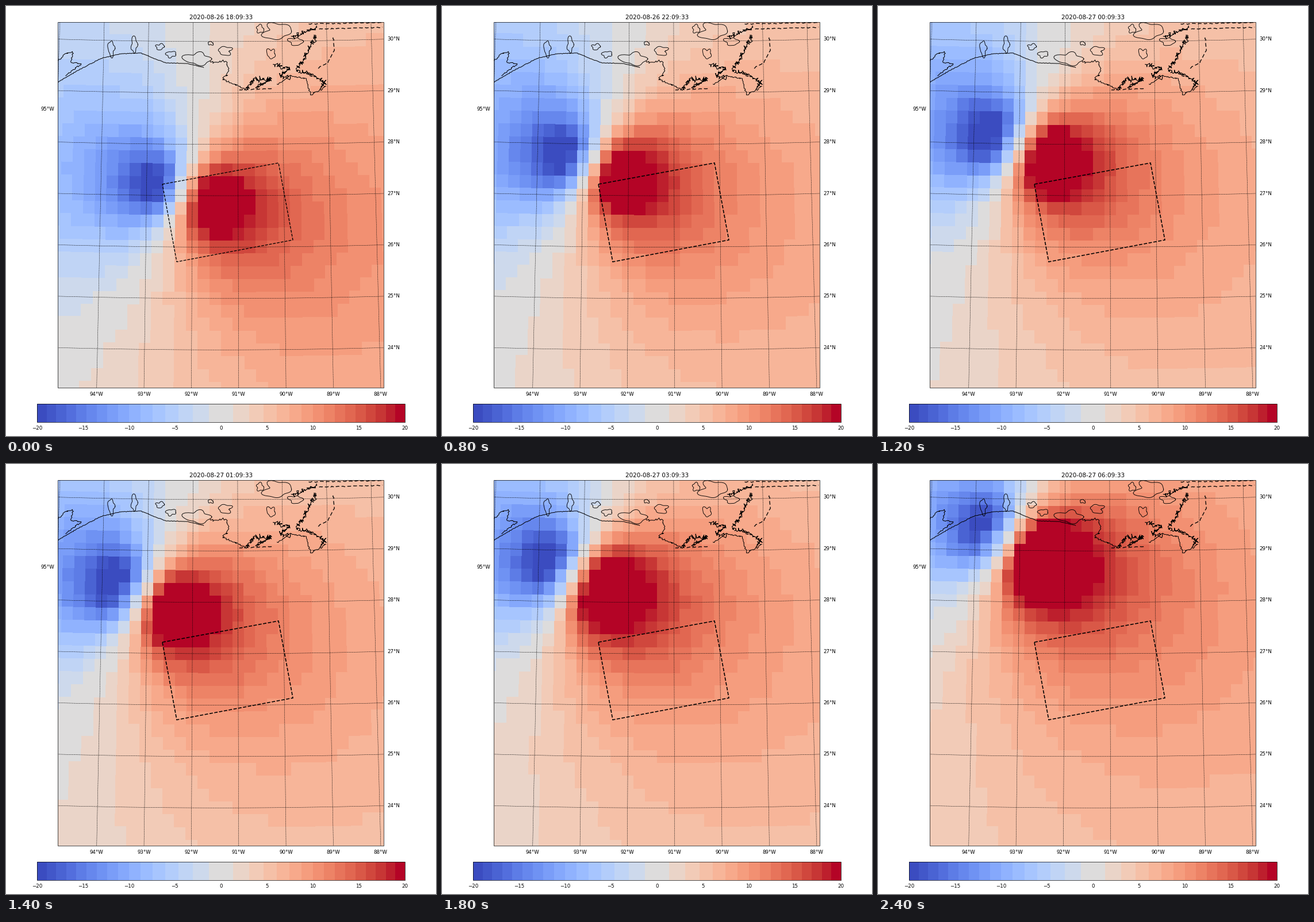
Write a matplotlib script that moves like this. It is 748 px wide and 748 px high and loops after 2600 ms.

```python
import numpy as np
import matplotlib.pyplot as plt
from matplotlib.animation import FuncAnimation
from matplotlib.colors import BoundaryNorm, ListedColormap
from matplotlib.patches import Polygon, Rectangle

SIZE, DPI = 748, 72          # at 72 dpi one point is one pixel
HOURS, MIDDLE = 13, 374
LEFT, RIGHT, TOP, BOTTOM = 90.3, 657.4, 28.3, 664
LABEL, TITLE, THIN = 8.66, 10.39, 0.69

plt.rcParams["font.family"] = "DejaVu Sans"
fig = plt.figure(figsize=(SIZE / DPI, SIZE / DPI), dpi=DPI, facecolor="white")
ax = fig.add_axes([0, 0, 1, 1])
ax.axis("off")

# Conic projection from degrees to stage pixels
CONE, RHO, DEGREE = 0.454, 10058, 89.4


def project(lon, lat):
    rho = RHO - (lat - 27) * DEGREE
    theta = CONE * np.radians(lon + 91.37)
    return MIDDLE + 0.3 + rho * np.sin(theta), 330 - RHO + rho * np.cos(theta)


lons, lats = np.arange(-95.25, -87, 0.25), np.arange(22.75, 30.9, 0.25)
cell_x, cell_y = project(*np.meshgrid(lons, lats))


def field(hour):
    """Northward wind of a growing, lopsided vortex in a weak steering flow."""
    s = hour / (HOURS - 1)
    dx = cell_x - (225 + 83 * (1 - s) ** 2.2)
    dy = cell_y - (325 - 185 * s ** 1.25)
    r = np.hypot(dx, dy) + 1e-6
    u = r / (52 + 8 * s)
    decay, inflow = 0.75 + 0.2 * s, np.radians(18 + 10 * s)
    speed = (32 + 6 * s) * u / (1 + u ** 4) ** ((1 + decay) / 4)
    speed *= 1 + 0.2 * s * dx / r
    steering = 1 + 1.5 * (2 * s - 1) ** 2
    wind = speed * (np.cos(inflow) * dx + np.sin(inflow) * dy) / r + steering
    return np.clip(wind, -19.99, 19.99)


# Stepped palette with wider steps around zero
steps = np.linspace(-1, 1, 32)
bands = 20 * np.sign(steps) * np.abs(steps) ** 0.8
mids = (bands[:-1] + bands[1:]) / 2
cmap = ListedColormap(plt.get_cmap("coolwarm")(0.5 + mids / (mids[-1] * 2)))
norm = BoundaryNorm(bands, len(mids))

frame_box = Rectangle((LEFT, TOP), RIGHT - LEFT, BOTTOM - TOP, fill=False,
                      ec="black", lw=THIN, zorder=6)
ax.add_patch(frame_box)
corners = project(*np.meshgrid(np.append(lons, lons[-1] + 0.25) - 0.125,
                               np.append(lats, lats[-1] + 0.25) - 0.125))
mesh = ax.pcolormesh(*corners, field(0), cmap=cmap, norm=norm)
mesh.set_clip_path(frame_box)


def line(x, y, width, style="-", z=4):
    artist, = ax.plot(x, y, color="black", lw=width, ls=style, zorder=z)
    artist.set_clip_path(frame_box)


def label(x, y, text, align="center", size=LABEL):
    return ax.text(x, y, text, ha=align, va="baseline", size=size, color="black")


# Graticule
for lon in range(-95, -87):
    line(*project(lon, np.linspace(23, 31, 60)), 0.55, "--", 3)
for lat in range(24, 31):
    line(*project(np.linspace(-95.5, -87, 60), lat), 0.55, "--", 3)
    label(663.3, project(-87.93, lat)[1] + 2.3, f"{lat}°N", "left")
for lon in range(-94, -87):
    label(project(lon, 23.25)[0], 678.4, f"{-lon}°W")
label(84.3, 182.2, "95°W", "right")


# Coastline: key points joined by ragged shores, lakes as ragged ovals
def shore(points, spread=0.3, step=2, width=1.0, style="-"):
    p = np.array(points, float)
    along = np.append(0, np.cumsum(np.hypot(*np.diff(p, axis=0).T)))
    s = np.arange(0, along[-1], step)
    shake = np.random.default_rng(len(s)).normal(0, spread, (2, len(s)))
    line(*(np.interp(s, along, p[:, k]) + shake[k] for k in (0, 1)), width, style)


def lake(x, y, width, height, seed):
    t = np.linspace(0, 2 * np.pi, 40)
    rng = np.random.default_rng(seed)
    r = 1 + sum(0.12 * np.cos(k * t + rng.uniform(0, 6)) for k in range(2, 6))
    line(x + r * np.cos(t) * width / 2, y + r * np.sin(t) * height / 2, 0.9)


shore([(91, 132), (125, 112), (166, 91), (200, 83), (235, 82), (278, 99),
       (314, 100), (345, 107)])
shore([(91, 95), (104, 82), (117, 80), (112, 99), (132, 100), (104, 121)], 0.8)
shore([(355, 98), (384, 96), (387, 112), (378, 128), (405, 139), (416, 146)], 1)
shore([(472, 137), (495, 121), (522, 127), (530, 154), (547, 146), (557, 138)], 0.8)

for marsh in ([(418, 146), (430, 128), (461, 127), (435, 142)],
              [(466, 103), (494, 109), (478, 121), (496, 123)],
              [(505, 112), (525, 117), (556, 132), (548, 145)],
              [(506, 110), (520, 88), (530, 68), (541, 50)],
              [(497, 55), (541, 36)]):
    shore(marsh, 2, 1, 1.1)

for island in ([(406, 146), (437, 145), (462, 143)],
               [(569, 55), (571, 77), (560, 98), (542, 109)],
               [(545, 40), (656, 37)],
               [(527, 31), (656, 29)]):
    shore(island, 0.4, 2, 1.3, (0, (5, 3)))

for seed, oval in enumerate([
        (183, 74, 12, 24), (223, 67, 11, 25), (268, 71, 14, 10), (287, 84, 16, 11),
        (333, 92, 42, 22), (356, 65, 9, 6), (381, 78, 24, 14), (442, 40, 13, 13),
        (472, 44, 48, 27), (461, 83, 14, 17), (504, 62, 22, 14)]):
    lake(*oval, seed)

# Scan area
area = Polygon([(272, 310), (474, 273), (499, 407), (297, 445)], fill=False,
               ec="black", lw=1.3, ls="--", zorder=5)
ax.add_patch(area)

# Colour bar
BAR_TOP, BAR_BOTTOM = 692, 724


def bar_x(value):
    return MIDDLE + 16 * value


ax.pcolormesh(bar_x(bands), [BAR_TOP, BAR_BOTTOM], mids[None, :],
              cmap=cmap, norm=norm)
ax.add_patch(Rectangle((bar_x(-20), BAR_TOP), 640, BAR_BOTTOM - BAR_TOP,
                       fill=False, ec="black", lw=THIN))
for value in range(-20, 21, 5):
    line([bar_x(value)] * 2, [BAR_BOTTOM, BAR_BOTTOM + 3], THIN)
    ax.lines[-1].set_clip_path(None)
    label(bar_x(value), 736.8, str(value).replace("-", "\u2212"))

title = label(MIDDLE, 22.6, "", size=TITLE)
ax.set_xlim(0, SIZE)
ax.set_ylim(SIZE, 0)


def draw(hour):
    mesh.set_array(field(hour))
    area.set_linewidth(min(1.3 + 0.2 * hour, 1.6))
    days, clock = divmod(18 + hour, 24)
    title.set_text(f"2020-08-{26 + days} {clock:02d}:09:33")
    return mesh, area, title


animation = FuncAnimation(fig, draw, frames=HOURS, interval=200, repeat=True)
plt.show()
```
